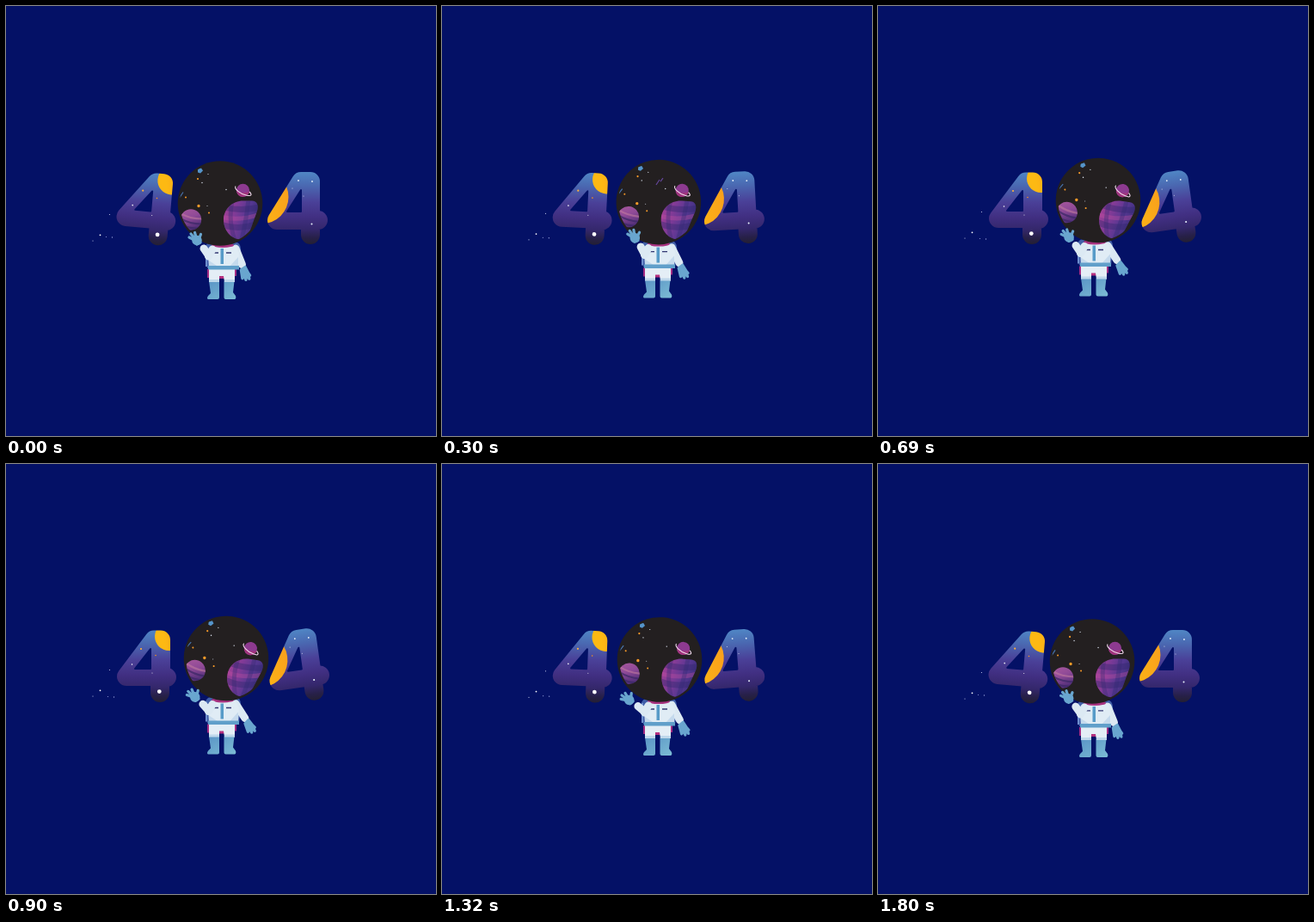
An HTML page for the animation above (1.83 s loop, 500 px wide and 500 px high).

```html
<!DOCTYPE html>
<html>
<head>
<meta charset="utf-8">
<style>
html, body { margin: 0; width: 100%; height: 100%; overflow: hidden; background: #041166; }
svg { display: block; width: 100vw; height: 100vh; }
.glove { fill: #69a6cf; stroke: #69a6cf; stroke-width: 3.2; stroke-linecap: round; stroke-linejoin: round; }
.sleeve { stroke: #dce9f3; stroke-width: 9; stroke-linecap: round; }
</style>
</head>
<body>
<svg viewBox="0 0 500 500">
  <defs>
    <linearGradient id="sky" gradientUnits="userSpaceOnUse" x1="0" y1="192" x2="0" y2="278">
      <stop offset="0" stop-color="#5088c6"/>
      <stop offset=".2" stop-color="#4a68b1"/>
      <stop offset=".42" stop-color="#4a4098"/>
      <stop offset=".62" stop-color="#412f82"/>
      <stop offset=".79" stop-color="#34276b"/>
      <stop offset=".9" stop-color="#272049"/>
      <stop offset="1" stop-color="#231f30"/>
    </linearGradient>
    <linearGradient id="sun" x1="0" y1=".6" x2="1" y2=".4">
      <stop offset=".3" stop-color="#fdb913"/>
      <stop offset="1" stop-color="#f9a01c"/>
    </linearGradient>
    <linearGradient id="big" x1="0" y1=".35" x2="1" y2=".65">
      <stop offset="0" stop-color="#a03f96"/>
      <stop offset=".35" stop-color="#7a3a96"/>
      <stop offset=".65" stop-color="#553791"/>
      <stop offset="1" stop-color="#3a2d78"/>
    </linearGradient>
    <linearGradient id="small" x1="0" y1="0" x2=".4" y2="1">
      <stop offset="0" stop-color="#a8589c"/>
      <stop offset=".5" stop-color="#8f4a97"/>
      <stop offset="1" stop-color="#54307a"/>
    </linearGradient>
    <linearGradient id="boot" x1="0" y1="0" x2="1" y2="1">
      <stop offset="0" stop-color="#5a94c6"/>
      <stop offset="1" stop-color="#7cbcd4"/>
    </linearGradient>
    <mask id="leftMask">
      <g fill="#fff" stroke="#fff" stroke-width="22" stroke-linejoin="round" stroke-linecap="round">
        <path d="M172 204.5H180V247H140Z"/><path d="M180 248H187M179 247V266"/>
      </g>
      <path d="M168 215V238H150Z" stroke="#000" stroke-width="2" stroke-linejoin="round"/>
    </mask>
    <mask id="rightMask">
      <g fill="#fff" stroke="#fff" stroke-width="22" stroke-linejoin="round" stroke-linecap="round">
        <path d="M343 204H354V249H315Z"/><path d="M354 249H363M354 249V266"/>
      </g>
      <path d="M343 214V239H327Z" stroke="#000" stroke-width="2" stroke-linejoin="round"/>
    </mask>
    <clipPath id="visor"><circle r="47"/></clipPath>
    <clipPath id="bigClip"><path id="bigShape" d="M4 19C4 7 14-3 27-3H37C43-3 45 2 43 9L34 34Q31 42 25 42C12 42 4 31 4 19Z"/></clipPath>
    <clipPath id="smallClip"><circle cx="-34" cy="19" r="12.2"/></clipPath>
  </defs>

  <g id="drift" fill="#c6cdec">
    <circle cx="109.5" cy="266.3" r=".9" fill="#fff"/>
    <circle cx="101" cy="273" r=".6"/>
    <circle cx="120.5" cy="242.5" r=".6"/>
  </g>
  <g id="dust" fill="#8f9bd8">
    <circle cx="116.5" cy="268.5" r=".6"/><circle cx="123.5" cy="269" r=".7"/>
  </g>

  <g id="left">
    <g mask="url(#leftMask)">
      <path d="M120 185H205V285H120Z" fill="url(#sky)"/>
      <circle cx="189.5" cy="200.5" r="16.5" fill="url(#sun)"/>
    </g>
    <g fill="#fff">
      <circle cx="178.3" cy="264.6" r="2.4"/>
      <circle cx="146.5" cy="233" r=".8"/><circle cx="170" cy="243" r=".5"/>
      <circle cx="157" cy="215" r="1.1" fill="#fbb040"/>
      <circle cx="174" cy="222.5" r=".8" fill="#f7941d"/>
    </g>
  </g>

  <g id="right">
    <g mask="url(#rightMask)">
      <path d="M295 185H382V285H295Z" fill="url(#sky)"/>
      <circle cx="297" cy="222" r="31.5" fill="url(#sun)"/>
    </g>
    <g fill="#e8f2fb">
      <circle cx="340" cy="203" r=".9"/><circle cx="356" cy="204" r=".9"/>
      <circle cx="333" cy="212" r=".5"/><circle cx="346" cy="221" r=".5"/>
      <circle cx="355.5" cy="253.5" r="1"/>
    </g>
  </g>

  <g id="body">
    <path d="M236 275H269Q274 277 273 288L271 305H234L231 286Q231 277 236 275Z" fill="#415fa9"/>
    <path d="M233 280V303" stroke="#6e8fce" stroke-width="2"/>
    <path d="M235 306V316M267 306V314" stroke="#a32b83" stroke-width="2"/>
    <path d="M243 309H260V317H243Z" fill="#b5307f"/>
    <g id="rightArm">
      <path class="sleeve" d="M267 282L273.5 301"/>
      <path class="glove" d="M272 307L277 304L281 313L282 314L280 311L281 318L278 313L277 319L275.5 314L273 317Z"/>
    </g>
    <path d="M238 279Q251 275 267 279L271 287L270 304H236L235 288Z" fill="#e0ecf5"/>
    <path d="M236 296L248 304H236ZM270 292V304H259Z" fill="#c5daed"/>
    <ellipse cx="252" cy="278" rx="13" ry="3" fill="#a83280"/>
    <path d="M249.5 282H253V300H249.5Z" fill="#579bc8"/>
    <path d="M241 287H247M256 287H262" stroke="#323772" stroke-width="1.3"/>
    <path d="M236 305H266V321H254L253 314H248V321H236Z" fill="#e4eef6"/>
    <path d="M235 302H271V306.5H235Z" fill="#609fca"/>
    <path d="M236 320H248V339Q248 341 246 341H235Q233 340 235 337L238 334ZM253.5 320H265.5L264 333L267 337Q268 340 266 341H255.5Q253.5 341 253.5 339Z" fill="url(#boot)"/>
    <path d="M236 318H248V321H236ZM254 318H266V321H254Z" fill="#bfd8eb"/>
    <path class="sleeve" d="M240 283L235.5 291"/>
  </g>

  <g id="head">
    <circle r="49.3" fill="#231f20"/>
    <g clip-path="url(#visor)">
      <use href="#bigShape" fill="url(#big)"/>
      <g clip-path="url(#bigClip)" fill="none">
        <path d="M2 4Q24 10 48 4M2 25Q24 32 48 22" stroke="#2f276d" stroke-width="7" opacity=".4"/>
        <path d="M2 16Q24 21 48 12" stroke="#c650a0" stroke-width="5" opacity=".35"/>
        <path d="M15-6Q8 18 18 46M33-6Q31 18 24 46" stroke="#33296f" stroke-width="5" opacity=".35"/>
      </g>
      <circle cx="-34" cy="19" r="12.2" fill="url(#small)"/>
      <g clip-path="url(#smallClip)" fill="none" stroke-width="2.2">
        <path d="M-47 11Q-36 18-20 18" stroke="#c27a9e" opacity=".6"/>
        <path d="M-47 17Q-36 24-20 24M-47 24Q-36 30-22 29" stroke="#392766" opacity=".7"/>
      </g>
      <circle cx="26.5" cy="-15.2" r="7.6" fill="#8d3a90"/>
      <path d="M19-15Q26-10 34-14Q33-8 26-7.6Q20-8 19-15Z" fill="#a0347c"/>
      <path d="M18-20C16-17 23-11 31-9.3C37-8 37-10.5 34-13.5" fill="none" stroke="#f1d9ed" stroke-width="1.1"/>
      <path d="M-26-40L-22-41L-20-38L-23-35L-26-36Z" fill="#5594ca"/>
      <path d="M-47-7L-43-13" stroke="#4a79b6" stroke-width="1.1"/>
      <g fill="#f79a28">
        <circle cx="-25" cy="3" r="1.7"/><circle cx="-13" cy="11" r="1"/>
        <circle cx="-26" cy="-28.5" r="1.1"/><circle cx="-40" cy="-7" r="1"/>
      </g>
      <g fill="#dfe6f2">
        <circle cx="-21" cy="-24" r=".7"/><circle cx="7" cy="-16" r=".7"/>
        <circle cx="-14" cy="-34" r=".6"/><circle cx="-15" cy="3" r=".5"/>
      </g>
    </g>
  </g>
  <path id="comet" d="M249 208L253 202M254 204L257 200" stroke="#65479c" stroke-width="1.2"/>
  <g id="wave">
    <path class="sleeve" d="M235.5 290L230 282"/>
    <g class="glove">
      <circle cx="222" cy="272.5" r="4.2"/>
      <path d="M222 277L226 275M221 273L213 269M221 272L215 265M222 272L219.5 263.5M224 272L226.5 265.5"/>
    </g>
  </g>
</svg>
<script>
const LOOP = 1830;
const el = id => document.getElementById(id);
const ease = x => .2 * x + .4 * (1 - Math.cos(Math.PI * x));
const move = (id, value) => el(id).setAttribute('transform', value);

// Sway to one side, pause there, and return.
function sway(t) {
  if (t < 690) return ease(t / 690);
  if (t < 900) return 1;
  return ease((LOOP - t) / (LOOP - 900));
}

function draw(now) {
  const t = now % LOOP, p = sway(t);
  const lift = `translate(0 ${-3.5 * p})`;
  const wave = -4 + 11 * Math.cos(2 * Math.PI * (t - 350) / LOOP);
  move('drift', `translate(0 ${-3 * p})`);
  move('dust', `translate(${2 * p} ${2 * p})`);
  move('left', `rotate(${5 * (1 - p)} 163 240)`);
  move('right', `translate(${p} 0) rotate(${-8 * p} 339 240)`);
  move('body', lift);
  move('rightArm', `rotate(${-3 - 11 * p} 268 282)`);
  move('wave', `${lift} rotate(${wave} 235 291)`);
  move('head', `translate(${249 + 7 * p} ${229.5 - 3.5 * p}) rotate(${8 * p})`);
  const c = (t - 300) / 150;
  move('comet', `translate(${-6 * c} ${6 * c})`);
  el('comet').setAttribute('opacity', Math.max(0, 1 - Math.abs(c)));
}

const start = performance.now();
function tick() {
  draw(performance.now() - start);
  requestAnimationFrame(tick);
}
tick();
</script>
</body>
</html>
```
